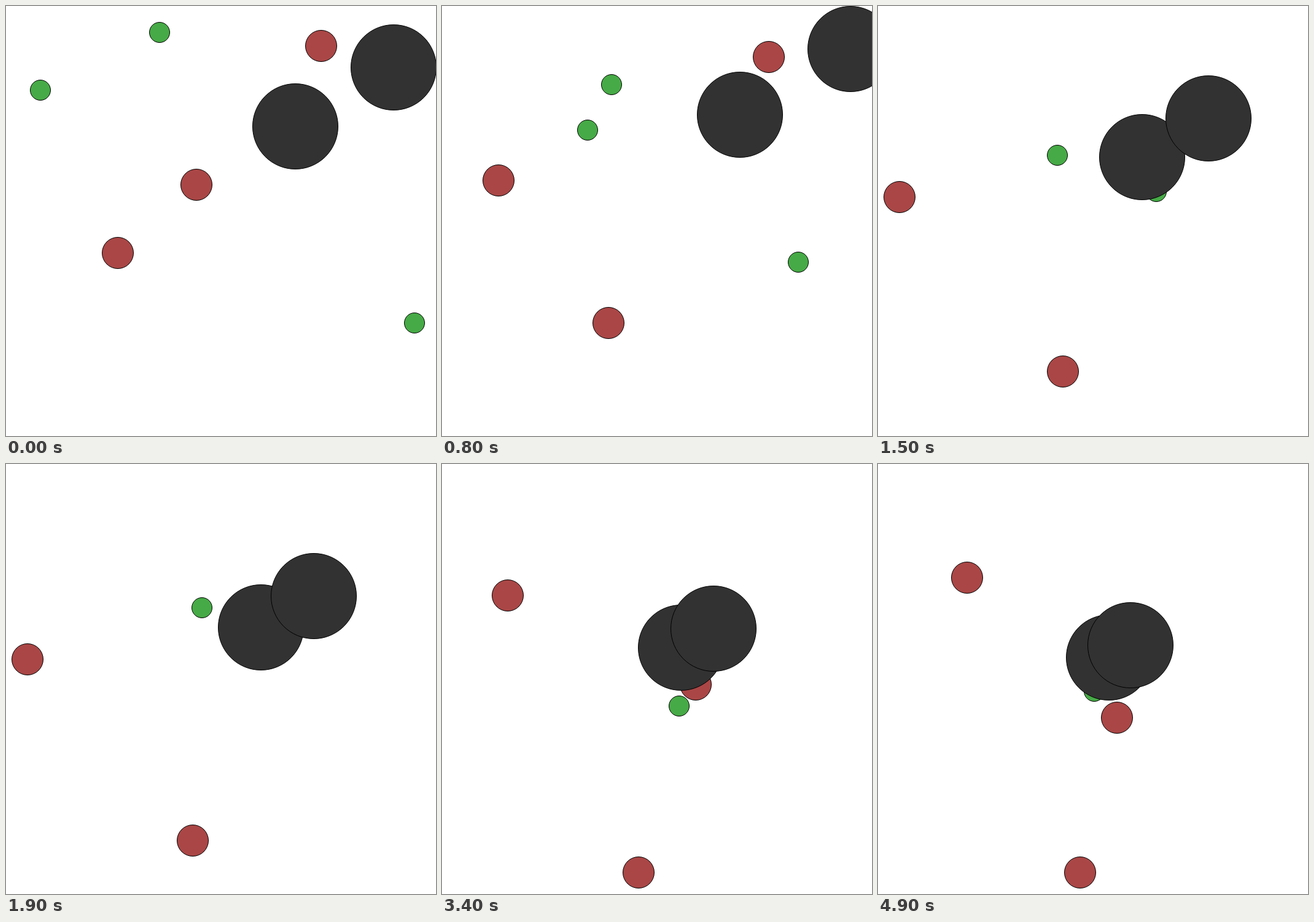
These frames come from a looping animation (700x700 px, 5 s). An HTML page with a canvas:

```html
<!DOCTYPE html>
<html lang="en">
<head>
<meta charset="utf-8">
<title>Bodies in a zooming view</title>
<style>
  html, body { margin: 0; width: 100%; height: 100%; overflow: hidden; background: #fff; }
  canvas { display: block; }
</style>
</head>
<body>
<canvas id="stage" width="700" height="700"></canvas>
<script>
const ctx = document.getElementById('stage').getContext('2d');
const STEP = 100, STEPS = 50;
const MID = 350, REACH = 315;

const RED = { fill: '#aa4646', r: 25.5, lift: 0 };
const GREEN = { fill: '#46aa46', r: 16.5, lift: 0 };
const DARK = { fill: '#323232', r: 69.5, lift: 1.5 };

const body = (kind, ...keys) => ({ kind, keys });

// Turning points [step, x, y] in world units around the centre;
// later bodies are painted on top.
const bodies = [
  body(GREEN, [0, -100, -307], [5, -100, -183], [11, -101, -106], [19, -58, -216], [28, 30, -185]),
  body(GREEN, [0, -294, -213], [5, -156, -212], [11, 9, -179], [19, 110, -155]),
  body(GREEN, [0, 315, 166], [2, 280, 166], [5, 241, 114], [11, 177, 6], [17, 145, -90],
    [27, 111, 54], [34, 111, 135], [49, 7, 92]),
  body(RED, [0, 163, -285], [5, 162, -274], [11, 163, -189], [19, 175, -100],
    [27, 231, 9], [34, 193, 28], [49, 180, 290]),
  body(RED, [0, -40, -59], [5, -143, -59], [19, -586, -59], [27, -729, -193],
    [34, -745, -417], [42, -813, -648], [49, -945, -760]),
  body(RED, [0, -168, 52], [5, -91, 78], [11, -61, 248], [19, -86, 490], [49, -97, 1451]),
  body(DARK, [0, 120.5, -153]),
  body(DARK, [0, 281, -248.2])
];

// Harmonic mean of the rates on both sides; flat where the motion reverses
function slope(keys, i, axis) {
  const rate = j => (keys[j + 1][axis] - keys[j][axis]) / (keys[j + 1][0] - keys[j][0]);
  if (i === 0) return rate(0);
  if (i === keys.length - 1) return rate(i - 1);
  const a = rate(i - 1), b = rate(i);
  return a * b > 0 ? 2 * a * b / (a + b) : 0;
}

// Smooth cubic through the keys, resting after the last one
function valueAt(keys, t, axis) {
  const next = keys.findIndex(k => k[0] > t);
  if (next < 0) return keys[keys.length - 1][axis];
  const a = keys[next - 1], b = keys[next];
  const h = b[0] - a[0], u = (t - a[0]) / h, v = 1 - u;
  return v * v * (1 + 2 * u) * a[axis] + u * u * (3 - 2 * u) * b[axis]
    + u * v * h * (v * slope(keys, next - 1, axis) - u * slope(keys, next, axis));
}

function draw(t) {
  const spots = bodies.map(({ keys }) => [valueAt(keys, t, 1), valueAt(keys, t, 2)]);
  // The view zooms so that the farthest body stays on the margin.
  const zoom = REACH / Math.max(...spots.flat().map(Math.abs));
  ctx.fillStyle = '#fff';
  ctx.fillRect(0, 0, 700, 700);
  ctx.strokeStyle = '#000';
  ctx.lineWidth = 1;
  bodies.forEach(({ kind }, i) => {
    const [x, y] = spots[i];
    ctx.beginPath();
    ctx.arc(Math.round(MID + x * zoom), Math.round(MID - kind.lift + y * zoom),
      kind.r, 0, Math.PI * 2);
    ctx.fillStyle = kind.fill;
    ctx.fill();
    ctx.stroke();
  });
}

const start = performance.now();
function tick() {
  const ms = Math.max(0, performance.now() - start);
  draw(Math.floor(ms / STEP) % STEPS);
  requestAnimationFrame(tick);
}
tick();
</script>
</body>
</html>
```
